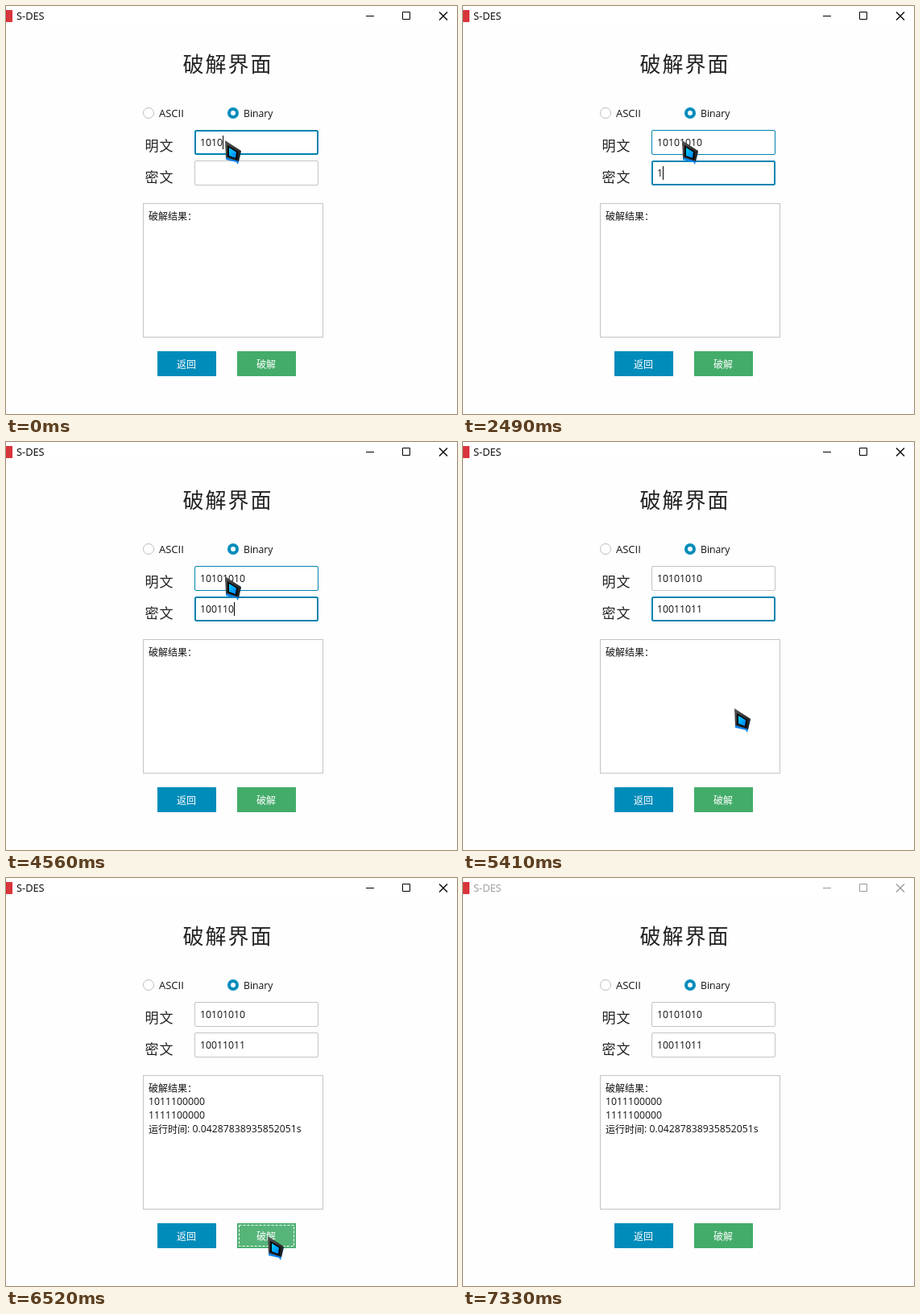
An HTML page that plays this animation: 560x507 px, repeating every 7.39 s.

```html
<!DOCTYPE html>
<html lang="zh-CN">
<head>
<meta charset="utf-8">
<title>S-DES</title>
<style>
  html, body { margin: 0; width: 100%; height: 100%; overflow: hidden; background: #fefefe; }
  svg { display: block; }
  text { font-family: "Open Sans", "Noto Sans", "Noto Sans CJK SC", sans-serif; font-size: 12.25px; fill: #111; }
  .cjk text, text.cjk { font-family: "Noto Sans CJK SC", "Noto Sans CJK", sans-serif; font-size: 12px; }
  .cjk .head { font-size: 26px; letter-spacing: 2px; fill: #222; }
  .cjk .label { font-size: 17px; letter-spacing: 1px; fill: #222; }
  .cjk .button { fill: #fff; }
  .box { fill: #fff; stroke: #c4c4c4; }
  .box.hover { stroke: #0083b0; }
  .box.focus { stroke: #0083b0; stroke-width: 2; x: 235px; width: 152px; height: 29px; }
  #plainBox.focus { y: 155px; }
  #cipherBox.focus { y: 193px; }
</style>
</head>
<body>
<svg width="560" height="507" viewBox="0 0 560 507">
  <rect width="560" height="25" fill="#fff"/>
  <rect x="-7" y="5" width="15" height="15" fill="#d8343c"/>
  <g id="bar">
    <text x="13" y="17" style="font-size:12.8px; fill:inherit">S-DES</text>
    <g fill="none" stroke="currentColor">
      <path d="M447 12.5h10M492.5 7.5h9v9h-9z"/>
      <path d="M538 7.5l10 10m0-10l-10 10" stroke-width="1.3"/>
    </g>
  </g>

  <circle cx="177" cy="133" r="6.5" fill="#fff" stroke="#bdbdbd"/>
  <circle cx="282" cy="133" r="7" fill="#008cba"/>
  <circle cx="282" cy="133" r="3" fill="#fff"/>
  <text x="190" y="138" style="font-size:13px">ASCII</text>
  <text x="295" y="138">Binary</text>

  <rect id="plainBox" class="box" x="234.5" y="154.5" width="153" height="30" rx="1.5"/>
  <rect id="cipherBox" class="box" x="234.5" y="192.5" width="153" height="30" rx="1.5"/>
  <text id="plain" x="241" y="174"></text>
  <text id="cipher" x="241" y="212"></text>
  <rect id="caret" width="1" height="17"/>

  <rect class="box" x="170.5" y="245.5" width="223" height="166"/>
  <rect x="188" y="429" width="73" height="31" fill="#008cba"/>
  <rect id="crack" x="287.5" y="429.5" width="72" height="30" stroke="#43ac6a"/>
  <rect id="ring" x="289.5" y="431.5" width="68" height="26" fill="none" stroke="#fff" stroke-dasharray="3 2"/>

  <g class="cjk">
    <text class="head" x="219.5" y="81.5">破解界面</text>
    <text class="label" x="172.5" y="179.5">明文</text>
    <text class="label" x="172.5" y="218.5">密文</text>
    <text x="177" y="265.5">破解结果：</text>
    <text class="button" x="212" y="449.5">返回</text>
    <text class="button" x="311" y="449.5">破解</text>
  </g>
  <g id="result">
    <text x="177" y="282">1011100000</text>
    <text x="177" y="299">1111100000</text>
    <text class="cjk" x="177" y="316.5">运行时间</text>
    <text x="225" y="316">: 0.04287838935852051s</text>
  </g>

  <defs>
    <linearGradient id="metal" x2="1" y2="1">
      <stop stop-color="#555"/><stop offset="1" stop-color="#161616"/>
    </linearGradient>
    <linearGradient id="glow" x2="1" y2="1">
      <stop stop-color="#00d0ff"/><stop offset="1" stop-color="#0080f8"/>
    </linearGradient>
  </defs>
  <g id="mouse">
    <path d="M1 21L20 14L16 30L14 27L1 24Z" fill="#0a84f0"/>
    <path d="M0 0L20 13L17 26L1 21Z" fill="url(#metal)"/>
    <path d="M3 6L16 14L15 24L3 20Z" fill="#050505"/>
    <path d="M5 9L14 14.5L13 22L5 19Z" fill="url(#glow)"/>
  </g>
</svg>
<script>
const LOOP = 7390;
const $ = id => document.getElementById(id);
const set = (id, attrs) => { for (const k in attrs) $(id).setAttribute(k, attrs[k]); };
const show = (id, on) => set(id, { visibility: on ? "visible" : "hidden" });

// Key press times of both fields
const plainKeys = [0, 0, 0, 0, 250, 520, 830, 1190];
const cipherKeys = [2490, 3200, 3470, 3770, 4110, 4410, 4680, 4840];
const caretOff = [[270, 580], [1170, 1470], [2520, 2800], [3410, 3680], [4290, 4560], [5170, 5440], [6000, LOOP]];
// Pointer path: time, x, y
const path = [
  [0, 272, 167], [5130, 272, 167], [5200, 281, 186], [5300, 309, 250], [5410, 337, 330],
  [5500, 332, 395], [5580, 323, 441], [5660, 324, 445], [6510, 324, 445], [6520, 325, 445],
  [6620, 345, 450], [6740, 430, 471], [6870, 562, 508], [LOOP, 562, 508]
];

const typed = (text, keys, t) => text.slice(0, keys.filter(k => k <= t).length);

function pointer(t) {
  const i = path.findIndex(p => p[0] > t);
  const [a, b] = [path[i - 1], path[i]];
  const u = (t - a[0]) / (b[0] - a[0]);
  return [1, 2].map(k => Math.round(a[k] + (b[k] - a[k]) * u));
}

function border(id, focus, hover) {
  $(id).classList.toggle("focus", focus);
  $(id).classList.toggle("hover", hover);
}

function draw(t) {
  const [x, y] = pointer(t);
  const second = t >= 1930, clicked = t >= 6000, inactive = t >= 7330;
  const over = (left, top, right, bottom) => x >= left && x < right && y >= top && y < bottom;

  $("plain").textContent = typed("10101010", plainKeys, t);
  $("cipher").textContent = typed("10011011", cipherKeys, t);
  border("plainBox", !second, over(234, 154, 388, 185));
  border("cipherBox", second && !clicked, over(234, 192, 388, 223));

  const field = $(second ? "cipher" : "plain");
  set("caret", { x: 241 + 7 * field.textContent.length, y: second ? 199 : 161 });
  show("caret", !caretOff.some(([from, to]) => t >= from && t < to));

  const pressed = clicked && t < 6120;
  const hover = over(287, 429, 360, 460);
  set("crack", { fill: pressed ? "#69bd88" : hover ? "#56b479" : "#43ac6a" });
  show("ring", clicked && !inactive);
  show("result", t >= 6150);

  const ink = inactive ? "#999" : "#000";
  set("bar", { fill: ink, color: ink });
  set("mouse", { transform: `translate(${x} ${y})` });
}

const start = performance.now();
function tick() {
  draw((performance.now() - start) % LOOP);
  requestAnimationFrame(tick);
}
tick();
</script>
</body>
</html>
```
